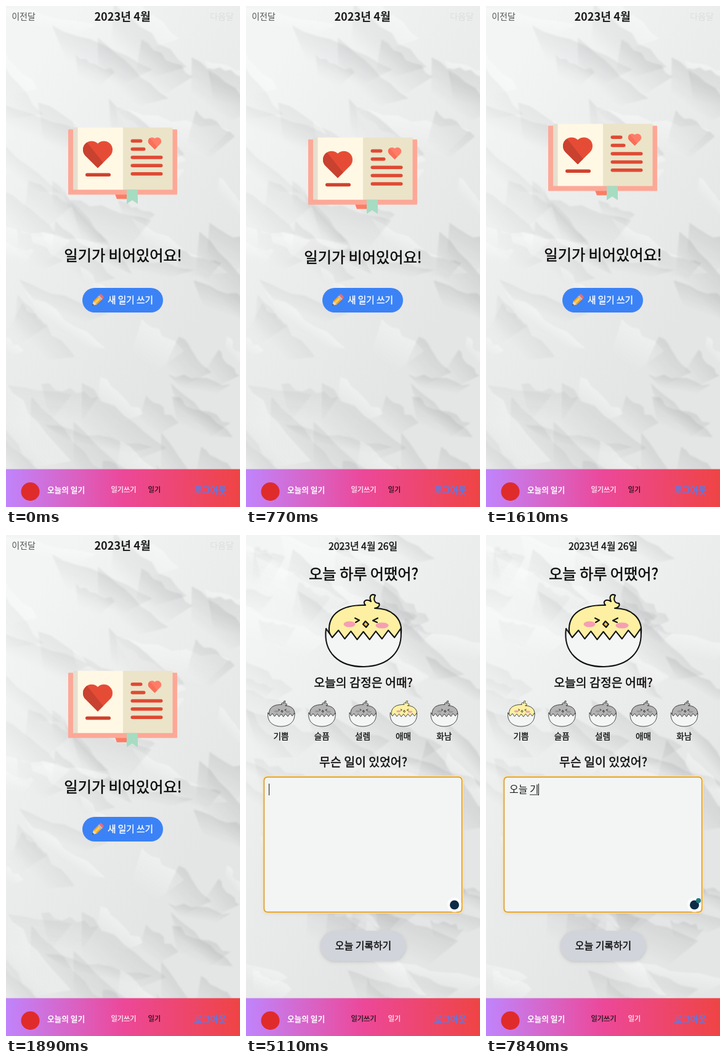
Write an HTML page with a canvas that moves like this. It is 380 px wide and 814 px high and loops after 8000 ms.

```html
<!DOCTYPE html>
<html lang="ko">
<head>
<meta charset="utf-8">
<style>
html, body { margin: 0; width: 100%; height: 100%; overflow: hidden; background: #ebecec; }
canvas { display: block; width: 380px; height: 814px; }
</style>
</head>
<body>
<canvas id="stage"></canvas>
<script>
const W = 380, H = 814, LOOP = 8000, STEP = 70;
const SWITCH = 2100, FOCUS = 3010, BLUR = 5460, PICK = 5600, REFOCUS = 5880;
const TYPE = 6230, SPACE = 6930, NEXT = 7700, NAV_TOP = 752.5;
const TAU = Math.PI * 2;
const FONT = '"Noto Sans CJK KR", "Noto Sans CJK", "Noto Sans CJK JP", sans-serif';
const dpr = window.devicePixelRatio || 1;
const stage = document.getElementById('stage');
let c = stage.getContext('2d');
stage.width = W * dpr;
stage.height = H * dpr;

const clamp = (v, lo = 0, hi = 1) => Math.max(lo, Math.min(hi, v));

function text(str, x, y, size, color = '#0b0b0b', weight = 500, align = 'center') {
  c.font = `${weight} ${size}px ${FONT}`;
  c.textAlign = align;
  c.textBaseline = 'alphabetic';
  c.fillStyle = c.strokeStyle = color;
  c.fillText(str, x, y + size * 0.36);
  // Thickens the medium weight towards a felt-pen line.
  if (weight === 500) {
    c.lineWidth = size * 0.022;
    c.strokeText(str, x, y + size * 0.36);
  }
}

function box(x, y, w, h, color, r = 0) {
  c.fillStyle = color;
  c.beginPath();
  c.roundRect(x, y, w, h, r);
  c.fill();
}

function shadowBox(x, y, w, h, color, r) {
  c.save();
  c.shadowColor = 'rgba(0,0,0,.14)';
  c.shadowBlur = 5 * dpr;
  c.shadowOffsetY = 2 * dpr;
  box(x, y, w, h, color, r);
  c.restore();
}

function oval(x, y, rx, color, ry = rx) {
  c.fillStyle = color;
  c.beginPath();
  c.ellipse(x, y, rx, ry, 0, 0, TAU);
  c.fill();
}

function poly(points, color) {
  c.fillStyle = color;
  c.beginPath();
  points.forEach(p => c.lineTo(...p));
  c.closePath();
  c.fill();
}

function random(seed) {
  return () => (seed = (seed * 16807) % 2147483647) / 2147483647;
}

// A crease is a jagged facet, shaded along one edge and fading to nothing.
function crease(rnd) {
  const x = rnd() * W, y = rnd() * H, len = 50 + rnd() * 150, depth = 15 + rnd() * 45;
  const rgb = rnd() < 0.6 ? '120,122,124' : '255,255,255';
  const shade = rgb[0] === '1' ? 0.06 + 0.1 * x / W : 0.35;
  c.save();
  c.translate(x, y);
  c.rotate(0.15 + rnd() * 0.75);
  const g = c.createLinearGradient(0, 0, 0, depth);
  g.addColorStop(0, `rgba(${rgb},${shade})`);
  g.addColorStop(1, `rgba(${rgb},0)`);
  const points = [[-len / 2, 0]];
  for (let i = 1; i < 8; i++) points.push([(i / 8 - 0.5) * len, (rnd() - 0.5) * 9]);
  points.push([len / 2, 0], [len * 0.3, depth], [-len * 0.25, depth]);
  poly(points, g);
  c.restore();
}

function paper(seed) {
  const sheet = document.createElement('canvas'), main = c, rnd = random(seed);
  sheet.width = W * dpr;
  sheet.height = H * dpr;
  c = sheet.getContext('2d');
  c.scale(dpr, dpr);
  const g = c.createLinearGradient(0, 150, W, 420);
  g.addColorStop(0, '#f3f5f5');
  g.addColorStop(0.5, '#ebecec');
  g.addColorStop(1, '#e4e5e5');
  c.fillStyle = g;
  c.fillRect(0, 0, W, H);
  c.filter = 'blur(1px)';
  for (let i = 0; i < 70; i++) crease(rnd);
  c = main;
  return sheet;
}

const listPaper = paper(2023), writePaper = paper(426);

function heart(x, y, w, color, shade) {
  const s = w / 1.707, d = s * 0.3536, cy = y + s * 0.8536;
  const shape = new Path2D();
  shape.arc(x - d, cy - d, s / 2, Math.PI * 0.75, Math.PI * 1.75);
  shape.arc(x + d, cy - d, s / 2, Math.PI * 1.25, Math.PI * 0.25);
  shape.lineTo(x, cy + 2 * d);
  shape.closePath();
  c.save();
  c.fillStyle = color;
  c.fill(shape);
  c.clip(shape);
  poly([[x - w, y], [x - w * 0.4, y], [x + w * 0.2, y + w * 0.75], [x, y + w], [x - w, y + w]], shade);
  c.restore();
}

function book(y) {
  c.save();
  c.translate(0, y);
  poly([[177, 108], [198, 108], [198, 116], [180, 116]], '#fc7d65');
  box(101, 3, 177, 106, '#fda897', 1);
  box(109, 0, 8, 101, '#e6dfcf');
  box(116.5, 0, 73.5, 101, '#fff8e5');
  box(190, 0, 80.5, 101, '#ebe4c9');
  poly([[196, 101], [214, 101], [214, 124], [205, 118], [196, 124]], '#a6dcc2');
  heart(149, 22, 48, '#e64c35', '#c9412f');
  heart(241.5, 16, 21.5, '#ff7d68', '#f96f59');
  box(129, 74, 41, 5.5, '#d0412f', 2.75);
  for (let i = 0; i < 5; i++) {
    box(202.5, 19 + i * 13.4, i < 2 ? 19 + i * 5 : 52, 5.5, '#df4a34', 2.75);
  }
  c.restore();
}

function pencil() {
  c.save();
  c.translate(149, 478);
  c.rotate(-Math.PI / 4);
  box(5, -4, 6, 8, '#ee6a78', 2);
  box(4, -4, 3, 8, '#b9c2cb');
  box(-6, -4, 10, 8, '#f6a623');
  box(-6, -1.5, 10, 3, '#fdd05b');
  poly([[-6, -4], [-12, 0], [-6, 4]], '#f5d9a8');
  poly([[-10, -1.4], [-12.5, 0], [-10, 1.4]], '#333');
  c.restore();
}

// Cubic ease with control points (0,0) and (.2,1), solved by bisection.
function ease(x) {
  let lo = 0, hi = 1;
  for (let i = 0; i < 20; i++) {
    const s = (lo + hi) / 2;
    if (0.6 * s * s + 0.4 * s ** 3 < x) lo = s; else hi = s;
  }
  return 3 * lo * lo - 2 * lo ** 3;
}

// 0 at the top of the bounce, 1 at the bottom.
function bounce(t) {
  const phase = (0.71 + t * 0.000925) % 1;
  return 1 - ease(Math.abs(phase - 0.5) * 2);
}

function nav(writing) {
  const g = c.createLinearGradient(0, 0, W, 0);
  ['#c084fc', '#ec4899', '#ef4444'].forEach((color, i) => g.addColorStop(i / 2, color));
  c.fillStyle = g;
  c.fillRect(0, NAV_TOP, W, H - NAV_TOP);
  oval(39.5, 789, 15, '#e02b2b');
  text('오늘의 일기', 97.5, 786, 12.7, '#fff', 700);
  text('일기쓰기', 191, 786, 11.2, writing ? '#111' : '#fff');
  text('일기', 241, 786, 11.2, writing ? '#fff' : '#111');
  text('로그아웃', 331.5, 787, 14.4, '#5b7be6', 700);
}

function listPage(t) {
  c.drawImage(listPaper, 0, 0, W, H);
  text('이전달', 28.5, 17, 14, '#555', 400);
  text('2023년 4월', 189, 17, 18.2, '#1c1c1c', 700);
  text('다음달', 350.5, 17, 14, '#dcdddd', 400);
  const b = bounce(t);
  book(187 + 46 * b);
  text('일기가 비어있어요!', 190, 403 + 9.2 * b, 24.2);
  box(124, 458, 131, 40, '#3b82f6', 20);
  pencil();
  text('새 일기 쓰기', 202, 478, 14.7, '#fff');
  nav(false);
}

function stroke(...points) {
  c.beginPath();
  points.forEach(p => c.lineTo(...p));
  c.stroke();
}

function chick(x, y, scale, lit) {
  c.save();
  c.translate(x, y);
  c.scale(scale, scale);
  c.lineWidth = 2.1;
  c.lineJoin = c.lineCap = 'round';
  c.strokeStyle = '#111';

  // Body with its tuft.
  c.fillStyle = lit ? '#fdf0a2' : '#b3b3b3';
  c.beginPath();
  c.moveTo(6, 60);
  c.bezierCurveTo(4, 30, 28, 16, 65, 17);
  c.bezierCurveTo(59, 11, 66, 6, 74, 11);
  c.bezierCurveTo(70, 2, 75, -2, 81, 1);
  c.bezierCurveTo(77, 8, 80, 14, 87, 14);
  c.bezierCurveTo(89, 18, 85, 22, 80, 22);
  c.bezierCurveTo(106, 22, 125, 37, 123, 62);
  c.lineTo(110, 85);
  c.lineTo(15, 85);
  c.closePath();
  c.fill();
  c.stroke();

  const cheek = lit ? '#f79fb2' : '#999';
  oval(39, 48, 9.5, cheek, 4.8);
  oval(92, 50, 10.5, cheek, 4.8);
  stroke([48, 38], [55, 41.5], [49, 45]);
  stroke([85, 38], [77, 42], [84, 45]);
  poly([[65, 43], [70, 48], [66, 53], [61, 48]], lit ? '#f0c34a' : '#888');
  c.stroke();

  // Zigzag shell, its rim lifted towards both ends.
  c.fillStyle = '#f4f5f5';
  c.beginPath();
  for (let i = 0; i <= 12; i++) {
    c.lineTo(1 + i * 10.1, (i % 2 ? 73 : 60) - 5 * ((i - 6) / 6) ** 2);
  }
  c.bezierCurveTo(127, 92, 103, 116, 62, 117);
  c.bezierCurveTo(22, 117, -4, 94, 1, 55);
  c.closePath();
  c.fill();
  c.stroke();
  c.restore();
}

// Committed text and the syllable still being composed.
function typed(t) {
  if (t >= SPACE) return ['오늘 ', t < NEXT ? '' : t < NEXT + 140 ? 'ㄱ' : '기'];
  const stages = ['', 'ㅇ', '오', '온', '오느', '오늘'];
  const s = stages[clamp(1 + Math.floor((t - TYPE) / 105), 0, 5)];
  return [s.slice(0, -1), s.slice(-1)];
}

const hasFocus = t => t >= FOCUS && (t < BLUR || t >= REFOCUS);

// Blinking restarts at each key press.
function caretOn(t) {
  const since = t < BLUR ? FOCUS : t >= NEXT ? NEXT : t >= SPACE ? SPACE : t;
  return hasFocus(t) && Math.floor((t - since + 30) / 516) % 2 === 0;
}

function badge(t) {
  const shown = hasFocus(t)
    ? 0.2 + 0.8 * clamp((t - (t < BLUR ? FOCUS : REFOCUS)) / 490)
    : t >= BLUR ? 1 - clamp((t - BLUR) / 280) : 0;
  if (!shown) return;
  const x = 335.5 + 3 * shown, y = 597.5 + 3.5 * shown;
  c.globalAlpha = clamp((shown - 0.2) / 0.8);
  oval(x, y, 11.5, '#fff');
  c.globalAlpha = shown;
  oval(x, y, 7.5, '#0f2b46');
  c.globalAlpha = 1;
  if (t >= TYPE) oval(345, 594, 4, '#1f7a80');
}

function ring(inset, color, width) {
  c.beginPath();
  c.roundRect(28.5 + inset, 392.5 + inset, 323 - 2 * inset, 221 - 2 * inset, 6 - inset);
  c.strokeStyle = color;
  c.lineWidth = width;
  c.stroke();
}

function field(t) {
  shadowBox(30, 394, 320, 218, '#f3f5f5', 4);
  if (hasFocus(t)) {
    ring(0, '#fae3a6', 3);
    ring(0.9, '#dc9a2c', 1.6);
  }
  const [done, draft] = typed(t);
  text(done + draft, 38, 413.5, 16, '#1c1c1c', 400, 'left');
  const from = 38 + c.measureText(done).width;
  const to = 38 + c.measureText(done + draft).width;
  if (draft) box(from, 421.5, to - from, 1, '#222');
  if (caretOn(t)) box(Math.round(to) - 1, 404, 1, 19, '#111');
  badge(t);
}

function writePage(t) {
  c.drawImage(writePaper, 0, 0, W, H);
  text('2023년 4월 26일', 190, 18.5, 15.8);
  text('오늘 하루 어땠어?', 191, 63, 24.2);
  chick(129, 97, 1, true);
  text('오늘의 감정은 어때?', 190.5, 240, 19.4);
  const picked = t < PICK ? 3 : 0;
  ['기쁨', '슬픔', '설렘', '애매', '화남'].forEach((mood, i) => {
    chick(35.3 + i * 66.2, 269.5, 0.355, i === picked);
    text(mood, 57 + i * 66.2, 327, 13.6);
  });
  text('무슨 일이 있었어?', 190.5, 369.5, 19.4);
  field(t);
  shadowBox(120.5, 643, 139, 49, '#d1d5db', 24.5);
  text('오늘 기록하기', 190.5, 667, 15.9);
  nav(true);
}

const start = performance.now();

function draw() {
  const now = (performance.now() - start) % LOOP;
  const t = Math.floor(now / STEP) * STEP;
  c.setTransform(dpr, 0, 0, dpr, 0, 0);
  if (t < SWITCH) listPage(t); else writePage(t);
  requestAnimationFrame(draw);
}
draw();
</script>
</body>
</html>
```
